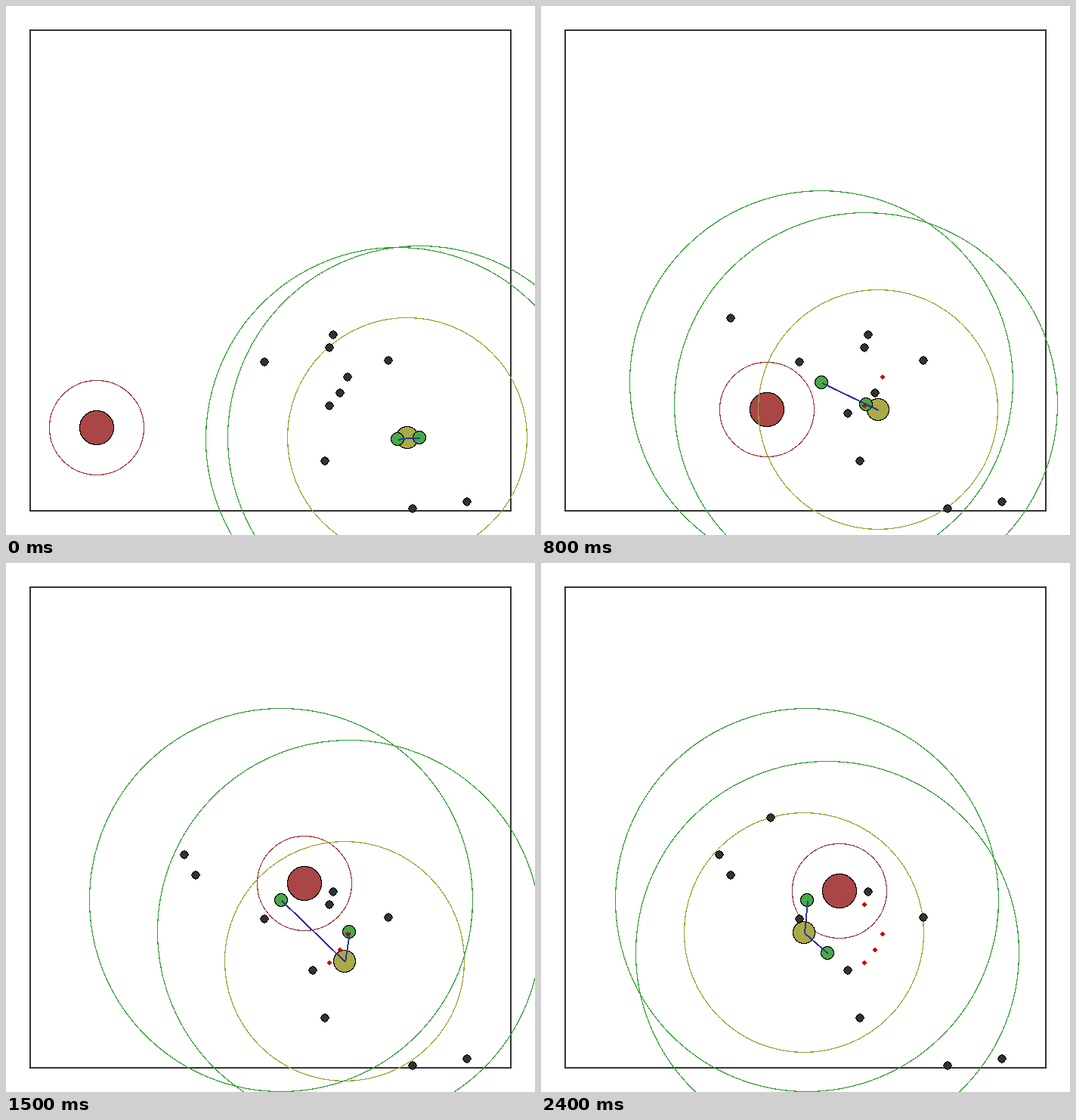
An HTML page that plays this animation: 700x700 px, repeating every 2.5 s.

```html
<!DOCTYPE html>
<html>
<head>
<meta charset="utf-8">
<style>
  html, body { margin: 0; width: 100%; height: 100%; overflow: hidden; background: #fff; }
  svg { display: block; width: 700px; height: 700px; }
</style>
</head>
<body>
<svg id="stage" viewBox="0 0 700 700" shape-rendering="crispEdges"></svg>
<script>
const STEP = 100, STEPS = 25, REACH = 14;
const stage = document.getElementById('stage');

// All agents reach the end of a leg at these steps, at a steady pace within it.
const legEnds = [0, 6, 10, 13, 18, 22, 24];
const hunter = {
  r: 22.5, sight: 62.5, fill: '#aa4646', ring: '#a03232',
  legs: ['120,558', '255,558', '342,510', '382,440', '415,399', '421,433', '395,434']
};
const leader = {
  r: 14.5, sight: 158.5, fill: '#aaaa46', ring: '#a0a032',
  legs: ['531,571', '449,531', '443,536', '447,517', '449,541', '378,531', '348,489']
};
const scout = legs => ({ r: 8.5, sight: 253.5, fill: '#46aa46', ring: '#32a032', legs });
const scouts = [
  scout(['518,573', '452,491 380,455', '368,510 392,490', '386,472',
         '360,448 414,413', '379,453', '352,446']),
  scout(['547,571', '467,571', '428,529 442,512 452,491 455,473', '447,502',
         '464,466', '428,452 385,536', '379,516'])
];
const agents = [hunter, leader, ...scouts];

const points = text => text.split(' ').map(p => p.split(',').map(Number));
const startFood = points('433,435 428,452 342,471 506,469 452,491 442,512 428,529 422,602 538,665 610,656');
const spareFood = points('251,413 406,539 236,386 304,337');

const dist = (a, b) => Math.hypot(a[0] - b[0], a[1] - b[1]);

function place({ legs }, k) {
  const i = Math.max(1, legEnds.findIndex(end => end >= k));
  const route = [points(legs[i - 1]).pop(), ...points(legs[i])];
  const lengths = route.slice(1).map((p, j) => dist(p, route[j]));
  const total = lengths.reduce((a, b) => a + b);
  let left = total * (k - legEnds[i - 1]) / (legEnds[i] - legEnds[i - 1]);
  let j = 0;
  while (j < lengths.length - 1 && left > lengths[j]) left -= lengths[j++];
  return route[j].map((v, axis) => Math.round(v + (route[j + 1][axis] - v) * left / lengths[j]));
}

// Scouts eat what they touch; every meal brings one new piece of food.
function foodAt(k) {
  let fresh = startFood, eaten = [], spare = 0;
  for (let s = 0; s <= k; s++) {
    const mouths = scouts.map(a => place(a, s));
    const meals = fresh.filter(f => mouths.some(m => dist(m, f) < REACH));
    fresh = fresh.filter(f => !meals.includes(f))
                 .concat(spareFood.slice(spare, spare += meals.length));
    eaten = eaten.concat(meals);
  }
  return { fresh, eaten };
}

const circle = ([x, y], r, fill, stroke) =>
  `<circle cx="${x}" cy="${y}" r="${r}" fill="${fill}" stroke="${stroke}" stroke-width="1.2"/>`;

// A small eight-cornered dot, slightly pointed along the axes.
function pellet([x, y], r, fill, stroke) {
  const corners = Array.from({ length: 8 }, (_, i) => {
    const a = i * Math.PI / 4, d = i % 2 ? r * 0.87 : r;
    return `${x + d * Math.cos(a)},${y + d * Math.sin(a)}`;
  });
  return `<polygon points="${corners.join(' ')}" fill="${fill}" stroke="${stroke}"/>`;
}

function drawAgent(agent, k) {
  const at = place(agent, k);
  return circle(at, agent.sight, 'none', agent.ring) + circle(at, agent.r, agent.fill, '#000');
}

function drawLink(agent, k) {
  const [from, to] = [leader, agent].map(a => place(a, k).map(v => v + 1));
  return `<path d="M${from}L${to}" stroke="#3232a0" stroke-width="2"/>`;
}

function draw(k) {
  const { fresh, eaten } = foodAt(k);
  stage.innerHTML = [
    '<rect x="32" y="32" width="636" height="636" fill="none" stroke="#323232" stroke-width="2"/>',
    ...agents.map(a => drawAgent(a, k)),
    ...fresh.map(f => pellet(f, 5.5, '#323232', '#000')),
    ...eaten.map(f => pellet(f, 3, '#c80000', 'none')),
    ...scouts.map(s => drawLink(s, k))
  ].join('');
}

const start = performance.now();
let shown = -1;
function tick() {
  const k = Math.floor((performance.now() - start) / STEP) % STEPS;
  if (k !== shown) draw(shown = k);
  requestAnimationFrame(tick);
}
tick();
</script>
</body>
</html>
```
